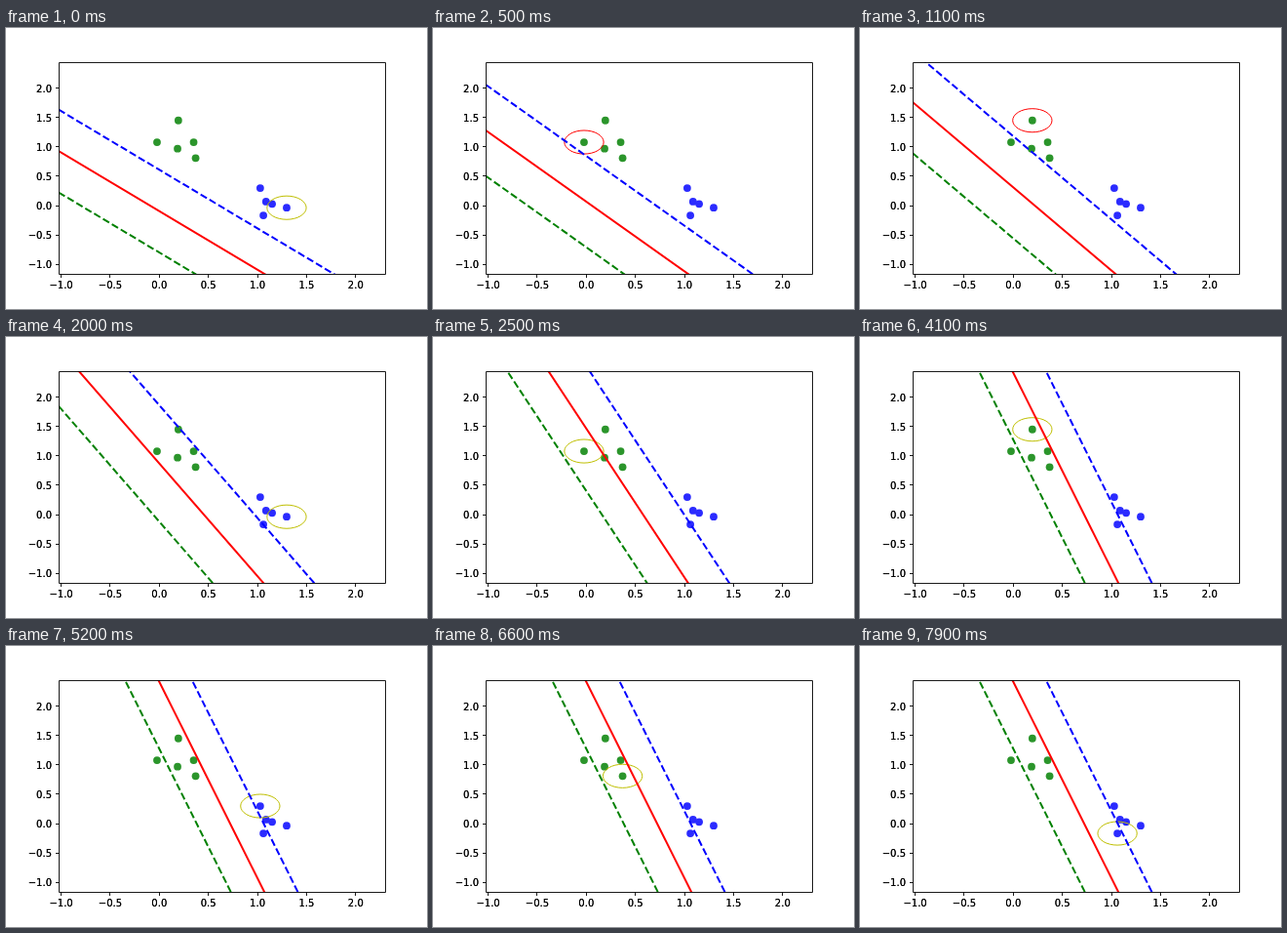
An HTML page with a canvas that plays this animation: 432x288 px, repeating every 8000 ms.

```html
<!DOCTYPE html>
<html>
<head>
<meta charset="utf-8">
<title>Perceptron training</title>
<style>
html, body { margin: 0; width: 100%; height: 100%; overflow: hidden; background: #fff; }
canvas { display: block; }
</style>
</head>
<body>
<canvas id="stage" width="432" height="288"></canvas>
<script>
const ctx = document.getElementById('stage').getContext('2d');
const STEP = 100, STEPS = 80, RATE = 0.05;
const BOX = { l: 54, t: 35, r: 389, b: 252 };
const px = x => 157.3 + 100.75 * x;
const py = y => 182.1 - 60.25 * y;

const green = [[0.194, 1.45], [-0.023, 1.08], [0.35, 1.08], [0.186, 0.97], [0.37, 0.81]];
const blue = [[1.028, 0.3], [1.087, 0.07], [1.149, 0.03], [1.06, -0.165], [1.297, -0.035]];
const g = i => ({ p: green[i], label: -1 });
const b = i => ({ p: blue[i], label: 1 });
// order in which the samples are visited, over and over
const visits = [b(4), g(0), b(0), b(1), g(3), g(1), g(4), b(2), g(2), b(3)];

// perceptron: weights move only when the visited sample is on the wrong side
function train() {
  let w = [1.003, 1.006, 0.093];
  const states = [];
  for (let i = 0; i < STEPS; i++) {
    const { p, label } = visits[i % visits.length];
    const wrong = label * (w[0] * p[0] + w[1] * p[1] + w[2]) <= 0;
    if (wrong) w = [...p, 1].map((v, k) => w[k] + RATE * label * v);
    states.push({ w, p, wrong });
  }
  return states;
}
const states = train();

function stroke(color, width, dash = []) {
  ctx.strokeStyle = color;
  ctx.lineWidth = width;
  ctx.setLineDash(dash);
  ctx.stroke();
}

function boundary(w, offset, color, dash) {
  const slope = -w[0] / w[1] * -60.25 / 100.75;
  const y0 = py(-w[2] / w[1] + offset);
  const yAt = x => y0 + slope * (x - px(0));
  const xAt = y => px(0) + (y - y0) / slope;
  const x1 = Math.max(BOX.l, xAt(-1)), x2 = Math.min(BOX.r, xAt(289));
  ctx.beginPath();
  ctx.moveTo(x1, yAt(x1));
  ctx.lineTo(x2, yAt(x2));
  stroke(color, 2, dash);
}

function dots(points, color) {
  ctx.fillStyle = color;
  for (const [x, y] of points) {
    ctx.beginPath();
    ctx.arc(px(x), py(y), 3.9, 0, 2 * Math.PI);
    ctx.fill();
  }
}

function label(value, x, y) {
  const text = value.toFixed(1).replace('-', '\u2212');
  ctx.fillText(text, x, y);
  ctx.fillText(text, x, y);
}

function axes() {
  ctx.font = '10px "DejaVu Sans", sans-serif';
  ctx.fillStyle = '#000';
  ctx.beginPath();
  ctx.rect(BOX.l + 0.5, BOX.t + 0.5, BOX.r - BOX.l, BOX.b - BOX.t);
  for (let v = -1; v <= 2; v += 0.5) {
    const x = Math.floor(px(v)) + 0.5, y = Math.floor(py(v)) + 0.5;
    ctx.moveTo(x, BOX.b + 0.5);
    ctx.lineTo(x, BOX.b + 4);
    ctx.moveTo(BOX.l + 0.5, y);
    ctx.lineTo(BOX.l - 3, y);
    ctx.textAlign = 'center';
    label(v, px(v), 267);
    ctx.textAlign = 'right';
    label(v, 47, Math.round(py(v)) + 4);
  }
  stroke('#000', 0.9);
}

function draw(i) {
  const { w, p, wrong } = states[i];
  const margin = 1 / Math.hypot(w[0], w[1]);
  const dash = [7.4, 3.2];
  ctx.fillStyle = '#fff';
  ctx.fillRect(0, 0, 432, 288);
  ctx.save();
  ctx.beginPath();
  ctx.rect(BOX.l, BOX.t, BOX.r - BOX.l, BOX.b - BOX.t);
  ctx.clip();
  dots(blue, 'rgb(43,43,255)');
  dots(green, 'rgb(43,149,43)');
  ctx.beginPath();
  ctx.ellipse(px(p[0]), py(p[1]), 20.15, 12.05, 0, 0, 2 * Math.PI);
  stroke(wrong ? '#f00' : '#bfbf00', 1);
  boundary(w, 0, '#f00', []);
  boundary(w, margin, '#00f', dash);
  boundary(w, -margin, '#008000', dash);
  ctx.restore();
  axes();
}

let start = null;
function tick(now) {
  if (start === null) start = now;
  draw(Math.floor(Math.max(0, now - start) / STEP) % STEPS);
  requestAnimationFrame(tick);
}
draw(0);
requestAnimationFrame(tick);
</script>
</body>
</html>
```
